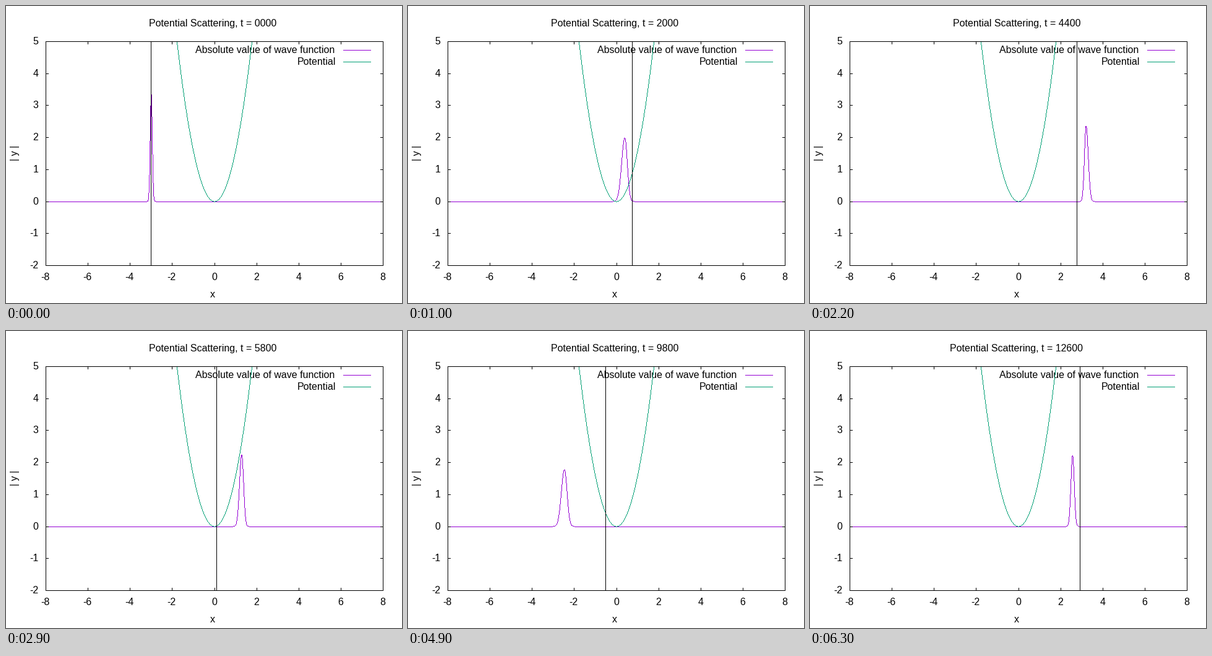
These frames come from a looping animation (640x480 px, 6400 ms). A matplotlib script:

```python
import numpy as np
import matplotlib.pyplot as plt
from matplotlib.animation import FuncAnimation

W, H, DPI = 640, 480, 100
FRAMES, INTERVAL = 64, 100
LEFT, RIGHT, TOP, BOTTOM = 64.5, 609.5, 57.5, 419.5
PX = 72 / DPI  # one pixel in points
PURPLE, GREEN = "#9400d3", "#009e73"
CURVATURE = 1.58

plt.rcParams["font.family"] = "Liberation Sans"

fig = plt.figure(figsize=(W / DPI, H / DPI), dpi=DPI, facecolor="white")
ax = fig.add_axes([0, 0, 1, 1])
ax.set_xlim(0, W)
ax.set_ylim(H, 0)
ax.axis("off")


def to_px(x):
    return LEFT + (x + 8) * (RIGHT - LEFT) / 16


def to_x(px):
    return (px - LEFT) * 16 / (RIGHT - LEFT) - 8


def to_py(y):
    return BOTTOM - (y + 2) * (BOTTOM - TOP) / 7


def stroke(xs, ys, color="black", z=6):
    return ax.plot(xs, ys, color=color, lw=PX, snap=False, zorder=z,
                   solid_joinstyle="miter", solid_capstyle="projecting")[0]


def label(x, y, text, align="center", **kw):
    return ax.text(x, y, text, ha=align, va="baseline", size=16 * PX,
                   color="black", zorder=1, **kw)


def pixel_rows(func, edges):
    """Top and bottom pixel edge of a hard one-pixel curve in each column."""
    parts = edges[:-1, None] + np.linspace(0, 1, 9)
    ys = np.maximum(to_py(func(to_x(parts))), TOP - 0.5)
    low, high = ys.min(axis=1), ys.max(axis=1)
    top, bottom = np.round(low), np.round(high)
    flat = top == bottom
    top[flat] = np.floor((low + high) / 2)[flat]
    bottom[flat] = top[flat] + 1
    return top, bottom


def curve(func, edges, color, z):
    top, bottom = pixel_rows(func, edges)
    return ax.stairs(top, edges, baseline=bottom, fill=True, color=color,
                     lw=0, snap=False, zorder=z)


def smooth(n, times, values):
    """Cubic Hermite curve through a few control points."""
    slopes = np.gradient(values, times)
    i = int(np.clip(np.searchsorted(times, n, "right") - 1, 0, len(times) - 2))
    d = times[i + 1] - times[i]
    u = (n - times[i]) / d
    return ((1 + 2 * u) * (1 - u) ** 2 * values[i]
            + u * (1 - u) ** 2 * d * slopes[i]
            + u * u * (3 - 2 * u) * values[i + 1]
            + u * u * (u - 1) * d * slopes[i + 1])


# Packet height and left/right lopsidedness over the frames
PEAK_T = [0, 1, 3, 5, 7, 10, 14, 18, 22, 29, 34, 39, 42, 49, 53, 57, 63]
PEAK = [3.37, 3.25, 2.77, 2.39, 2.14, 2.0, 2.09, 2.27, 2.36, 2.25, 2.19, 2.17,
        2.13, 1.79, 1.73, 1.87, 2.23]
SKEW_T = [0, 7, 10, 14, 22, 29, 39, 49, 63]
SKEW = [0, -0.13, -0.13, -0.08, 0.14, -0.07, 0.12, -0.08, -0.03]


def packet_center(n):
    phase = 0.13407 * n - 2.773
    return 3.27 * (np.cos(phase) + 0.033 * np.cos(3 * phase)) / 1.033


def classical_x(n):
    return 3.14 * np.cos(0.1508 * n - 2.838)


def packet(x, n):
    peak, skew = smooth(n, PEAK_T, PEAK), smooth(n, SKEW_T, SKEW)
    norm = 1 - 0.0048 * n  # the core slowly loses weight
    width = norm / (np.sqrt(np.pi) * peak ** 2)
    d = x - packet_center(n)
    return peak * np.exp(-0.5 * (d / (width * (1 + skew * np.sign(d)))) ** 2)


# Frame, tics and tic labels
stroke([LEFT, RIGHT, RIGHT, LEFT, LEFT], [TOP, TOP, BOTTOM, BOTTOM, TOP])
for v in range(-8, 9, 2):
    p = np.floor(to_px(v)) + 0.5
    stroke([p, p], [BOTTOM, BOTTOM - 4])
    stroke([p, p], [TOP, TOP + 4])
    text = str(v)
    label(p + 0.5 - len(text), 443, text)
for v in range(-2, 6):
    p = np.floor(to_py(v)) + 0.5
    stroke([LEFT, LEFT + 4], [p, p])
    stroke([RIGHT, RIGHT - 4], [p, p])
    label(52.5, p + 4.5, str(v), "right")

# Titles and key
title = label(334, 33, "")
label(334, 471, "x")
label(19, 238, "| y |", rotation=90, rotation_mode="anchor")
label(531, 76, "Absolute value of wave function", "right")
label(533, 95, "Potential", "right")
stroke([545.5, 589.5], [71.5, 71.5], PURPLE)
stroke([545.5, 589.5], [90.5, 90.5], GREEN)

# Curves
columns = np.arange(LEFT - 0.5, RIGHT + 1)
wave = curve(lambda x: packet(x, 0), columns, PURPLE, 3)
reach = np.sqrt(5 / CURVATURE)
bowl = np.arange(np.floor(to_px(-reach)), np.ceil(to_px(reach)) + 1)
curve(lambda x: CURVATURE * x ** 2, bowl, GREEN, 4)
marker = stroke([], [], z=5)


def draw(n):
    title.set_text(f"Potential Scattering, t = {200 * n:04d}")
    top, bottom = pixel_rows(lambda x: packet(x, n), columns)
    wave.set_data(values=top, baseline=bottom)
    x = np.floor(to_px(classical_x(n))) + 0.5
    marker.set_data([x, x], [TOP, BOTTOM])
    return title, wave, marker


anim = FuncAnimation(fig, draw, frames=FRAMES, interval=INTERVAL,
                     init_func=lambda: draw(0), repeat=True, repeat_delay=0)
plt.show()
```
